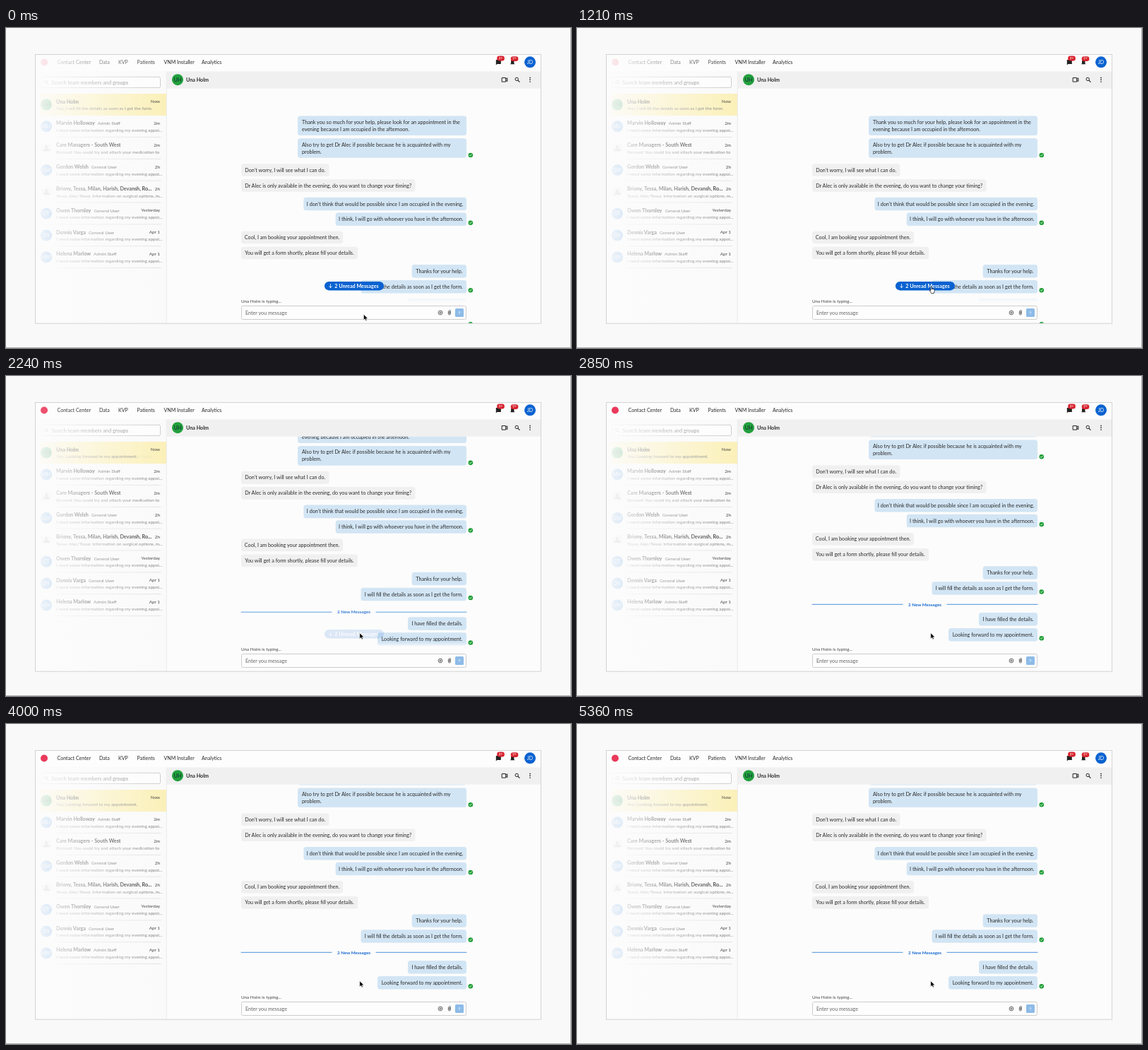
Write an HTML page that moves like this. It is 800x453 px and loops after 5.39 s.

```html
<!DOCTYPE html>
<html lang="en">
<head>
<meta charset="utf-8">
<title>Unread messages</title>
<style>
  html, body { margin: 0; width: 100%; height: 100%; overflow: hidden; background: #f9f9f9; }
  svg { display: block; width: 800px; height: 453px; }
  text { font-family: Lato, "Open Sans", sans-serif; white-space: pre; }
</style>
</head>
<body>
<svg id="stage" viewBox="0 0 800 453" xmlns="http://www.w3.org/2000/svg"></svg>
<script>
const LOOP = 5390;
const MOVE_START = 300, MOVE_END = 900, HAND_END = 2150, CLICK = 2190;
const BLUE = '#0a62d0', GREEN = '#21a03c', INK = '#2a2a2a';
const stage = document.getElementById('stage');

// y is the middle of the line of text
const label = (x, y, string, { size = 7.2, weight = 400, anchor = 'start', fill = INK } = {}) =>
  `<text x="${x}" y="${y + size * 0.35}" font-size="${size}" font-weight="${weight}" text-anchor="${anchor}" fill="${fill}">${string}</text>`;
const rect = (x, y, w, h, fill, extra = '') =>
  `<rect x="${x}" y="${y}" width="${w}" height="${h}" fill="${fill}" ${extra}/>`;
const circle = (x, y, r, fill, extra = '') =>
  `<circle cx="${x}" cy="${y}" r="${r}" fill="${fill}" ${extra}/>`;
const line = (d, stroke, width = 1) =>
  `<path d="${d}" fill="none" stroke="${stroke}" stroke-width="${width}" stroke-linecap="round" stroke-linejoin="round"/>`;

const avatar = (x, y, fill, initials, textFill = '#fff') =>
  circle(x, y, 8, fill) + label(x, y, initials, { size: 7, anchor: 'middle', fill: textFill });

const check = y => circle(657.8, y, 3.3, '#1f9d36') + line(`M656.3 ${y}l1.1 1.2 2-2.3`, '#fff', 0.8);

function bubble(mine, left, right, y, lines, checked) {
  const height = lines.length > 1 ? 27.6 : mine ? 18.6 : 17.6;
  const top = y - height / 2;
  const text = lines.length > 1
    ? lines.map((s, i) => label(left + 6, y - 5 + i * 10, s)).join('')
    : label((left + right) / 2, y, lines[0], { anchor: 'middle' });
  return rect(left, top, right - left, height, mine ? '#d2e5f4' : '#f0f0f0', 'rx="3.5"') + text +
    (checked ? check(y + (lines.length > 1 ? 10 : 5)) : '');
}

const history = [
  [true, 413, 652, 138.3, ['Thank you so much for your help, please look for an appointment in the', 'evening because I am occupied in the afternoon.']],
  [true, 413, 652, 170, ['Also try to get Dr Alec if possible because he is acquainted with my', 'problem.'], true],
  [false, 333, 457.5, 201, ['Don’t worry, I will see what I can do.']],
  [false, 333, 579.5, 223, ['Dr Alec is only available in the evening, do you want to change your timing?']],
  [true, 421.4, 652, 249, ['I don’t think that would be possible since I am occupied in the evening.']],
  [true, 466.7, 652, 270.7, ['I think, I will go with whoever you have in the afternoon.'], true],
  [false, 333, 477, 296.5, ['Cool, I am booking your appointment then.']],
  [false, 333, 498, 318.5, ['You will get a form shortly, please fill your details.']],
  [true, 574.7, 652, 344.2, ['Thanks for your help.']],
  [true, 502.5, 652, 366.2, ['I will fill the details as soon as I get the form.'], true]
].map(m => bubble(...m)).join('');

const latest =
  bubble(true, 569, 652, 344.2, ['I have filled the details.']) +
  bubble(true, 526, 652, 366.2, ['Looking forward to my appointment.'], true);

const need = 'I need some information regarding my evening appoi...';
const contacts = [
  ['Una Holm', '', 'Now', '', 'UH'],
  ['Marvin Holloway', 'Admin Staff', '2m', need, 'MH'],
  ['Care Managers - South West', '', '2m', 'Bernard: You could try and attach your medication to', ''],
  ['Gordon Welsh', 'General User', '2h', need, 'GW'],
  ['Briony, Tessa, Milan, Harish, Devansh, Ro...', '', '2h', 'Tessa: Alec/Tessa: Information on surgical options, m...', ''],
  ['Owen Thornley', 'General User', 'Yesterday', need, 'OT'],
  ['Dennis Varga', 'General User', 'Apr 1', need, 'DV'],
  ['Helena Marlow', 'Admin Staff', 'Apr 1', need, 'HM']
];

const groupIcon = y => circle(57, y, 8, '#ededed') + circle(57, y - 2, 2, '#999') +
  `<path d="M52.5 ${y + 4}q0-4 4.5-4t4.5 4z" fill="#999"/>`;

function contactRow([name, role, time, preview, initials], i) {
  const y = 104 + i * 30.85;
  const picture = initials ? avatar(57, y + 4.5, i ? '#3f8ddb' : GREEN, initials, i ? '#fff' : '#123') : groupIcon(y + 4.5);
  const heading = `<text x="71" y="${y + 2.5}" font-size="7.2" font-weight="700" fill="${INK}">${name}` +
    `<tspan dx="4" font-size="6.3" font-weight="400" fill="#444">${role}</tspan></text>`;
  return picture + heading +
    label(218, y, time, { size: 6.3, anchor: 'end', fill: '#333' }) +
    label(71, y + 10, preview, { size: 6.35, fill: '#777' }) +
    (i ? line(`M71 ${y + 19.6}H219`, '#d8d8d8', 0.7) : '');
}

const badge = (x, y) => rect(x - 5.3, y - 3.4, 10.6, 6.8, '#d8232f', 'rx="3.2"') +
  label(x, y, '9+', { size: 4.8, anchor: 'middle', fill: '#fff' });

const nav = rect(41.5, 37.5, 716, 24, '#fdfdfd') + circle(54, 48.5, 5, '#ea3a5b') +
  [[72.5, 'Contact Center'], [132, 'Data'], [159, 'KVP'], [185.5, 'Patients'], [223.5, 'VNM Installer'], [277, 'Analytics']]
    .map(([x, s]) => label(x, 48.7, s, { size: 7.1 })).join('') +
  `<path d="M693.8 45h7v6h-5.5l-1.5 1.4z" fill="#222"/>` + badge(700.5, 43) +
  `<path d="M714 51.3l1-1.2v-3q0-2.2 2.2-2.2t2.2 2.2v3l1 1.2z" fill="#222"/>` + badge(720, 43.6) +
  avatar(742, 48.3, BLUE, 'JD');

const chatHeader = rect(227, 61.5, 530.5, 24, '#f0f0f0') + avatar(243, 73.2, GREEN, 'UH', '#123') +
  label(255, 73.3, 'Una Holm', { weight: 700 }) +
  line('M702.5 70.5h5.2v5.6h-5.2zM707.7 72.4l2.1-1.5v4.8l-2.1-1.5', '#222', 1) +
  circle(723.2, 72.4, 2.2, 'none', 'stroke="#222" stroke-width="1"') + line('M724.9 74.1l2.2 2.2', '#222', 1.1) +
  [70.4, 73.2, 76].map(y => circle(742, y, 0.85, '#222')).join('');

const footer = rect(329, 377, 324, 41, 'url(#footFade)') +
  label(333, 387, 'Una Holm is typing...', { size: 6.3, fill: '#444' }) +
  rect(333.5, 393.5, 318, 19, '#fdfdfd', 'rx="2" stroke="#c8c8c8" stroke-width="0.9"') +
  label(339, 403.2, 'Enter you message', { fill: '#666' }) +
  circle(615, 403, 2.9, 'none', 'stroke="#444" stroke-width="0.8"') + line('M613.7 403h2.6M615 401.7v2.6', '#444', 0.8) +
  line('M626.3 401.2v3.2a1.6 1.6 0 0 0 3.2 0v-3.8a1.1 1.1 0 0 0-2.2 0v3.6a.5.5 0 0 0 1 0v-3', '#444', 0.7) +
  rect(636, 397, 12, 12, '#8dbbe8', 'rx="1.5"') + line('M642 404.6v-3M640.8 402.6l1.2-1.2 1.2 1.2', '#e4f0fb', 0.7);

const divider = line('M333 323.3H461M524 323.3H652', '#4a90de', 1) +
  label(492.5, 323.3, '2 New Messages', { size: 6.3, weight: 700, anchor: 'middle', fill: '#1768cf' });

const pill = rect(451, 359, 84, 12.4, BLUE, 'rx="6.2"') +
  line('M459.5 362.6v5M457.5 365.7l2 2 2-2', '#fff', 0.8) +
  label(496.5, 365.2, '2 Unread Messages', { weight: 700, anchor: 'middle', fill: '#fff' });

stage.innerHTML = `
<defs>
  <linearGradient id="sideFade" gradientUnits="userSpaceOnUse" x1="41" y1="0" x2="227" y2="0">
    <stop offset="0" stop-color="#fcfcfc" stop-opacity=".95"/>
    <stop offset=".2" stop-color="#fcfcfc" stop-opacity=".77"/>
    <stop offset="1" stop-color="#fcfcfc" stop-opacity="0"/>
  </linearGradient>
  <linearGradient id="footFade" x1="0" y1="0" x2="0" y2="1">
    <stop offset="0" stop-color="#fcfcfc" stop-opacity="0"/>
    <stop offset=".1" stop-color="#fcfcfc" stop-opacity=".6"/>
    <stop offset=".28" stop-color="#fcfcfc"/>
  </linearGradient>
  <clipPath id="chatClip"><rect x="227" y="85.5" width="530" height="332.5"/></clipPath>
</defs>
${rect(0, 0, 800, 453, '#f9f9f9')}
${line('M799.5 0V452.5H0', '#b0b0b0')}
${rect(41, 37, 716.5, 381, '#fcfcfc')}
<g clip-path="url(#chatClip)">
  <g id="history">${history}</g>
  <g id="divider">${divider}</g>
  <g id="latest">${latest}</g>
  ${footer}
</g>
${nav}
${rect(41.5, 61.5, 185.5, 356.5, '#fafafa')}
${rect(50.5, 69.3, 168, 15.2, '#fdfdfd', 'rx="2" stroke="#c6c6c6" stroke-width=".9"')}
${circle(56.5, 76.3, 2, 'none', 'stroke="#777" stroke-width=".8"')}${line('M58 77.8l1.8 1.8', '#777', 0.8)}
${label(64, 77, 'Search team members and groups', { size: 7.35, fill: '#777' })}
${rect(48, 93, 179, 31, '#fbf0b8')}
${contacts.map(contactRow).join('')}
<g id="oldPreview">${label(71, 114, 'You: I will fill the details as soon as I get the form.', { size: 6.35, fill: '#777' })}</g>
<g id="newPreview">${label(71, 114, 'You: Looking forward to my appointment.', { size: 6.35, fill: '#777' })}</g>
${rect(41.5, 62, 185.5, 356, 'url(#sideFade)')}
<g id="navFade">${rect(41.5, 37.5, 185.5, 24.5, 'url(#sideFade)')}</g>
${line('M227.3 62V418', '#e8e8e8', 0.8)}
${chatHeader}
${rect(41.5, 37.5, 716, 380.7, 'none', 'stroke="#cfcfcf" stroke-width=".9"')}
<g id="pill">${pill}</g>
<g id="cursor">
  <path id="arrow" d="M0 0V8.2L1.9 6.5 3.2 9.2 4.6 8.6 3.4 6H6Z" fill="#000" stroke="#fff" stroke-width=".6"/>
  <path id="hand" d="M0 3.2q0-1 .8-1t.8 1V6q.4-.7 1.2-.1.8-.4 1.3.3 1-.3 1.2.6v2.4L4.5 12H1L-1.2 8.6q-.4-1.2.5-1L0 8.2Z" fill="#fff" stroke="#000" stroke-width=".7"/>
</g>`;

const part = Object.fromEntries(
  [...stage.querySelectorAll('g[id], path[id]')].map(el => [el.id, el]));
const shift = (el, x, y) => el.setAttribute('transform', `translate(${x} ${y})`);
const fade = (el, value) => el.setAttribute('opacity', value);
const clamp = v => Math.min(1, Math.max(0, v));
const ease = v => v * v * (3 - 2 * v);

function draw(t) {
  const moved = ease(clamp((t - MOVE_START) / (MOVE_END - MOVE_START)));
  const settled = t < CLICK ? 0 : 1 - Math.exp((CLICK - t) / 25);
  const cursorY = 405.3 - 41.6 * moved;

  shift(part.history, 0, -65.7 * settled);
  shift(part.latest, 0, 48 * (1 - settled));
  shift(part.divider, 0, 84 * (1 - settled));
  fade(part.divider, settled);
  fade(part.pill, 1 - settled);
  fade(part.navFade, 1 - settled);
  fade(part.oldPreview, 1 - settled);
  fade(part.newPreview, settled);

  const pointing = cursorY < 371 && t < HAND_END;
  shift(part.cursor, 506.4 - 5.6 * moved, cursorY);
  fade(part.hand, pointing ? 1 : 0);
  fade(part.arrow, pointing ? 0 : 1);
}

function tick() {
  draw(performance.now() % LOOP);
  requestAnimationFrame(tick);
}
tick();
</script>
</body>
</html>
```
